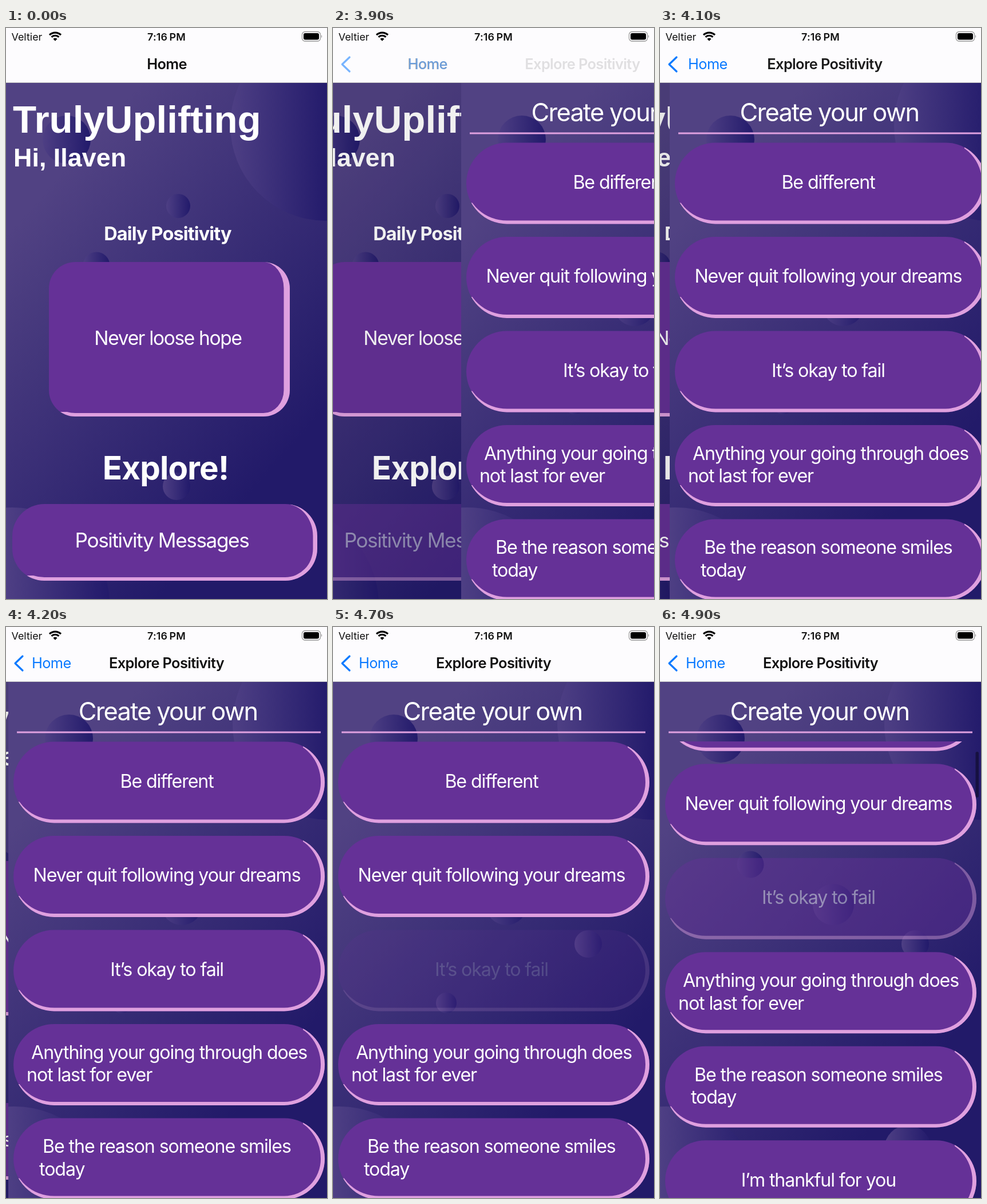
An HTML page that plays this animation: 561 px wide and 998 px high, repeating every 5 s.

```html
<!DOCTYPE html>
<html lang="en">
<head>
<meta charset="utf-8">
<title>Daily messages</title>
<style>
  html, body { margin: 0; width: 100%; height: 100%; overflow: hidden; background: #fff; }
  svg { display: block; width: 561px; height: 998px; }
  text {
    font-family: Inter, Roboto, sans-serif;
    font-optical-sizing: none;
    letter-spacing: -.04em;
    fill: #fff;
    white-space: pre;
  }
  .brand { font-family: "Liberation Sans", Arial, sans-serif; font-weight: 700; letter-spacing: 0; }
  .mid { text-anchor: middle; }
  .item { font-size: 32.2px; letter-spacing: -.035em; }
  .bar { font-size: 25.4px; letter-spacing: -.025em; fill: #111; }
  .semi { font-weight: 600; }
  .bold { font-weight: 700; letter-spacing: -.027em; }
  .heading { letter-spacing: -.015em; }
  .status { font-size: 17.9px; letter-spacing: 0; fill: #111; }
  .clock { letter-spacing: .01em; word-spacing: -.08em; }
  .blue { fill: #0a7aff; }
</style>
</head>
<body>
<svg id="stage" viewBox="0 0 561 998">
  <defs>
    <linearGradient id="sky" gradientUnits="userSpaceOnUse" x1="180" y1="158" x2="645" y2="568">
      <stop stop-color="#514283"/><stop offset="1" stop-color="#221a69"/>
    </linearGradient>
    <linearGradient id="ball">
      <stop stop-color="#4e3f84"/><stop offset="1" stop-color="#221a6b"/>
    </linearGradient>
    <linearGradient id="ballTop" href="#ball" gradientUnits="userSpaceOnUse" x1="392" x2="566"/>
    <linearGradient id="ballLow" href="#ball" gradientUnits="userSpaceOnUse" x1="0" x2="182"/>
    <clipPath id="page"><path d="M0 96H561V998H0Z"/></clipPath>
    <clipPath id="listArea"><path d="M0 200H561V998H0Z"/></clipPath>
    <g id="backdrop" clip-path="url(#page)">
      <path d="M0 96H561V998H0Z" fill="url(#sky)"/>
      <circle cx="559" cy="170" r="167" fill="url(#ballTop)"/>
      <circle cx="11" cy="1008" r="170" fill="url(#ballLow)"/>
      <g id="balls" fill="url(#ball)"></g>
    </g>
  </defs>

  <g id="home">
    <use href="#backdrop"/>
    <text class="brand" x="12" y="183" font-size="67.3">TrulyUplifting</text>
    <text class="brand" x="13" y="242" font-size="44.9">Hi, Ilaven</text>
    <text class="mid bold" x="282.5" y="371" font-size="32.5">Daily Positivity</text>
    <g id="daily"></g>
    <text class="mid" x="283" y="554" font-size="33.5">Never loose hope</text>
    <text class="mid bold heading" x="279" y="789" font-size="56.5">Explore!</text>
    <g id="open">
      <g id="openPill"></g>
      <text class="mid" x="272.5" y="908" font-size="35.2">Positivity Messages</text>
    </g>
    <path id="dim" d="M0 96H561V998H0Z" opacity="0"/>
  </g>

  <g id="explore">
    <use href="#backdrop"/>
    <text class="mid" x="279" y="163" font-size="43.4">Create your own</text>
    <path d="M15 184H546" stroke="#dfa0df" stroke-width="3"/>
    <g clip-path="url(#listArea)"><g id="list"></g></g>
    <rect id="thumb" x="551.5" width="5.5" height="80" rx="2.7" opacity=".4"/>
  </g>

  <path d="M0 0H561V96H0Z" fill="#fdfcfe"/>
  <path d="M0 95.5H561" stroke="#000" stroke-opacity=".25"/>
  <text id="oldTitle" class="bar semi mid" x="281" y="72">Home</text>
  <text id="newTitle" class="bar semi mid" x="280.5" y="72">Explore Positivity</text>
  <text id="backLabel" class="bar blue" x="45" y="72">Home</text>
  <path id="chevron" d="M29 51L16 63.5L29 76" fill="none" stroke="#0a7aff" stroke-width="3.2" stroke-linecap="round" stroke-linejoin="round"/>

  <text class="status" x="9.5" y="21.5">Veltier</text>
  <g fill="none" stroke="#000" stroke-width="3.1">
    <path d="M76 12.2A14.2 14.2 0 0 1 96 12.2"/>
    <path d="M79.6 15.9A9 9 0 0 1 92.4 15.9"/>
  </g>
  <path d="M82.4 19A5 5 0 0 1 89.6 19L86 22.8Z"/>
  <text class="status semi mid clock" x="280.5" y="21.5">7:16 PM</text>
  <rect x="517.5" y="6.5" width="32" height="16.5" rx="5" fill="none" stroke="#999" stroke-width="1.3"/>
  <rect x="520" y="9" width="27" height="11.5" rx="3"/>
  <path d="M551 12Q553.5 14.7 551 17.5Z" fill="#999"/>
</svg>

<script>
const $ = id => document.getElementById(id);
const LOOP = 5000, STEP = 100, WIDTH = 561;

// Rounded box; each corner is [rx, ry], clockwise from top left.
function box(x, y, w, h, [a, b, c, d]) {
  return `M${x + a[0]} ${y}H${x + w - b[0]}a${b} 0 0 1 ${b}V${y + h - c[1]}` +
    `a${c} 0 0 1 ${-c[0]} ${c[1]}H${x + d[0]}a${d} 0 0 1 ${-d[0]} ${-d[1]}` +
    `V${y + a[1]}a${a} 0 0 1 ${a[0]} ${-a[1]}Z`;
}

// Purple card with a pink rim on the right and bottom sides only.
let clips = 0;
function pill(x, y, w, h, r, side, base, cutX, cutY) {
  const id = 'rim' + clips++;
  const outer = box(x, y, w, h, Array(4).fill([r, r]));
  const inner = box(x, y, w - side, h - base,
    [[r, r], [r - side, r], [r - side, r - base], [r, r - base]]);
  return `<clipPath id="${id}"><path d="M${x + w - cutX} ${y - 1}H${x + w + 1}V${y + h + 1}H${x}V${y + cutY}H${x + w - cutX}Z"/></clipPath>
    <path d="${outer}" fill="#653197"/>
    <path d="${outer}${inner}" fill="#dfa0df" fill-rule="evenodd" clip-path="url(#${id})"/>`;
}

const balls = [[106, 195, 42], [301, 311, 21], [158, 415, 23.5], [303, 485, 36],
  [446, 554, 24], [198, 657, 18], [298, 801, 24], [433, 912, 41]];
$('balls').innerHTML = balls.map(([x, y, r]) => `<circle cx="${x}" cy="${y}" r="${r}"/>`).join('');

$('daily').innerHTML = pill(75, 409, 421, 270, 46, 10.5, 6, 46, 262);
$('openPill').innerHTML = pill(11, 832, 533, 134, 56, 7.5, 6, 47, 125);

const messages = [
  ['Be different'],
  ['Never quit following your dreams'],
  ['It’s okay to fail'],
  ['Anything your going through does', 'not last for ever', 40, 32],
  ['Be the reason someone smiles', 'today', 60, 54],
  ['I’m thankful for you']
];
$('list').innerHTML = messages.map(([first, second, x1, x2], i) => {
  const y = 200.4 + 164.5 * i;
  const label = second
    ? `<text class="item" x="${x1}" y="${y + 61}">${first}</text><text class="item" x="${x2}" y="${y + 100.5}">${second}</text>`
    : `<text class="item mid" x="277" y="${y + 80.5}">${first}</text>`;
  return `<g>${pill(9, y, 544, 142, 71, 7, 6, 38, 105)}${label}</g>`;
}).join('');
const pressed = $('list').children[2];

const shift = (el, x, y = 0) => el.setAttribute('transform', `translate(${x} ${y})`);
const fade = (el, v) => el.setAttribute('opacity', Math.max(0, Math.min(1, v)));

// Value of the last key at or before t.
const hold = (t, keys) => keys.reduce((v, [at, next]) => t >= at ? next : v, keys[0][1]);

// Remaining distance of a critically damped push, 1 to 0.
function remaining(t) {
  if (t < 3900) return 1;
  const s = 16.6 * (t - 3778) / 1000;
  return t > 4400 ? 0 : (1 + s) * Math.exp(-s);
}

function draw(t) {
  const q = remaining(t);
  shift($('home'), -0.3 * WIDTH * (1 - q));
  shift($('explore'), WIDTH * q);
  $('home').style.display = q ? '' : 'none';
  $('explore').style.display = q < 1 ? '' : 'none';
  fade($('dim'), 0.1 * (1 - q));
  fade($('open'), hold(t, [[0, 1], [3700, .17], [3900, .5], [4000, .87], [4100, 1]]));

  const n = hold(t, [[0, 1], [3900, .42], [4000, .13], [4100, .02], [4200, 0]]);
  const started = n < 1;
  shift($('oldTitle'), -200 * (1 - n));
  fade($('oldTitle'), started ? 1.6 * n - .4 : 1);
  shift($('newTitle'), 370 * n);
  fade($('newTitle'), 1 - 2.1 * n);
  shift($('backLabel'), 205 * n);
  fade($('backLabel'), started ? 1.1 - 1.5 * n : 0);
  fade($('chevron'), started ? 1.1 - 1.3 * n : 0);

  const scroll = hold(t, [[0, 0], [4800, 21.7], [4900, 125.7]]);
  shift($('list'), 0, -scroll);
  $('thumb').setAttribute('y', 204.7 + scroll * .106);
  fade($('thumb'), scroll ? .4 : 0);
  fade(pressed, hold(t, [[0, 1], [4700, .17], [4800, .15], [4900, .45]]));
}

function tick(now) {
  draw(Math.floor(now % LOOP / STEP) * STEP);
  requestAnimationFrame(tick);
}
draw(0);
requestAnimationFrame(tick);
</script>
</body>
</html>
```
